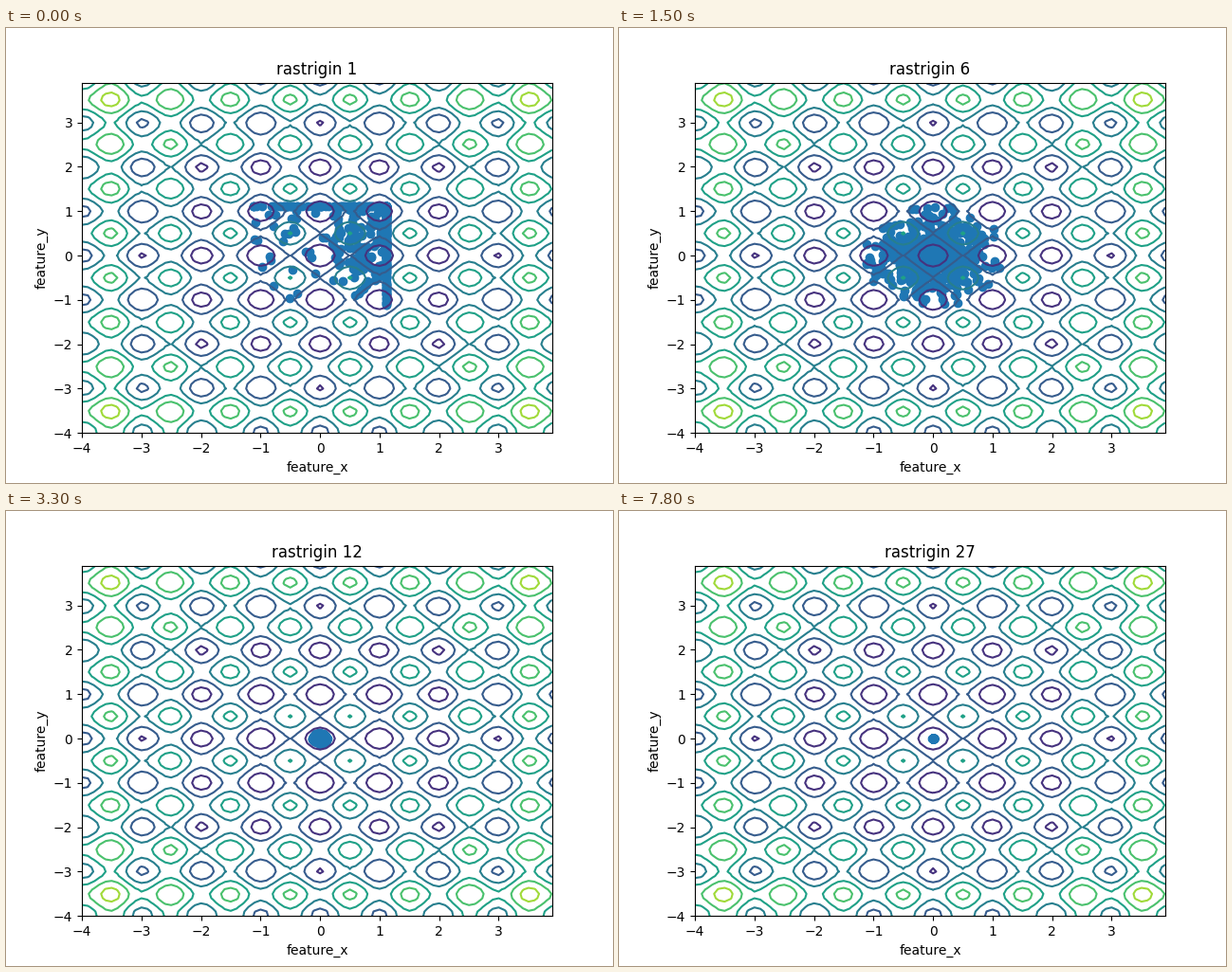
A matplotlib script for the animation above (8 s loop, 640 px wide and 480 px high).

```python
import numpy as np
import matplotlib.pyplot as plt
from matplotlib.animation import FuncAnimation

BOUND = 1.12
COUNT = 500
TICKS_PER_STEP = 3


def rastrigin(x, y):
    return 20 + x**2 + y**2 - 10 * (np.cos(2 * np.pi * x) + np.cos(2 * np.pi * y))


def first_swarm(rng):
    """Particles pushed towards the upper right, a few left behind."""
    dense = np.column_stack([.2 + np.abs(rng.normal(0, 1.1, 250)),
                             rng.normal(.4, .65, 250)])
    right = np.column_stack([np.full(50, BOUND), rng.uniform(-BOUND, BOUND, 50)])
    top = np.column_stack([BOUND - rng.rayleigh(.9, 50), np.full(50, BOUND)])
    sparse = np.column_stack([rng.uniform(-BOUND, .2, 30), rng.normal(.3, .45, 30)])
    return np.vstack([dense, right, top, sparse])


def round_swarm(rng, spread, drift):
    """Gaussian cloud without its far tail."""
    radius = spread * np.sqrt(-2 * np.log(1 - .97 * rng.random(COUNT)))
    angle = rng.uniform(0, 2 * np.pi, COUNT)
    return drift + np.column_stack([radius * np.cos(angle), radius * np.sin(angle)])


def swarm(step):
    rng = np.random.default_rng(100 + step)
    if step == 1:
        points = first_swarm(rng)
    else:
        spread = np.exp(np.interp(step, [4, 6, 8, 12, 27],
                                  np.log([1.3, .45, .32, .05, .004])))
        points = round_swarm(rng, spread, drift=.2 * max(0, 4 - step))
    return np.clip(points, -BOUND, BOUND)


fig, ax = plt.subplots(figsize=(6.4, 4.8), dpi=100)
axis = np.arange(-4, 4, .1)
gx, gy = np.meshgrid(axis, axis)
# The tiny offset keeps minima lying exactly on a level from showing as specks
ax.contour(gx, gy, rastrigin(gx, gy) + 1e-9, levels=range(10, 61, 10),
           cmap="viridis", vmin=0, vmax=70)
dots = ax.scatter([], [], color="C0")
ax.set(xlim=(-4, 3.9), ylim=(-4, 3.9), xticks=range(-4, 4), yticks=range(-4, 4),
       xlabel="feature_x", ylabel="feature_y")
title = ax.set_title("rastrigin 1")


def update(tick):
    step = tick // TICKS_PER_STEP + 1
    dots.set_offsets(swarm(step))
    title.set_text(f"rastrigin {step}")
    return dots, title


anim = FuncAnimation(fig, update, frames=80, interval=100, repeat=True, repeat_delay=0)
plt.show()
```
